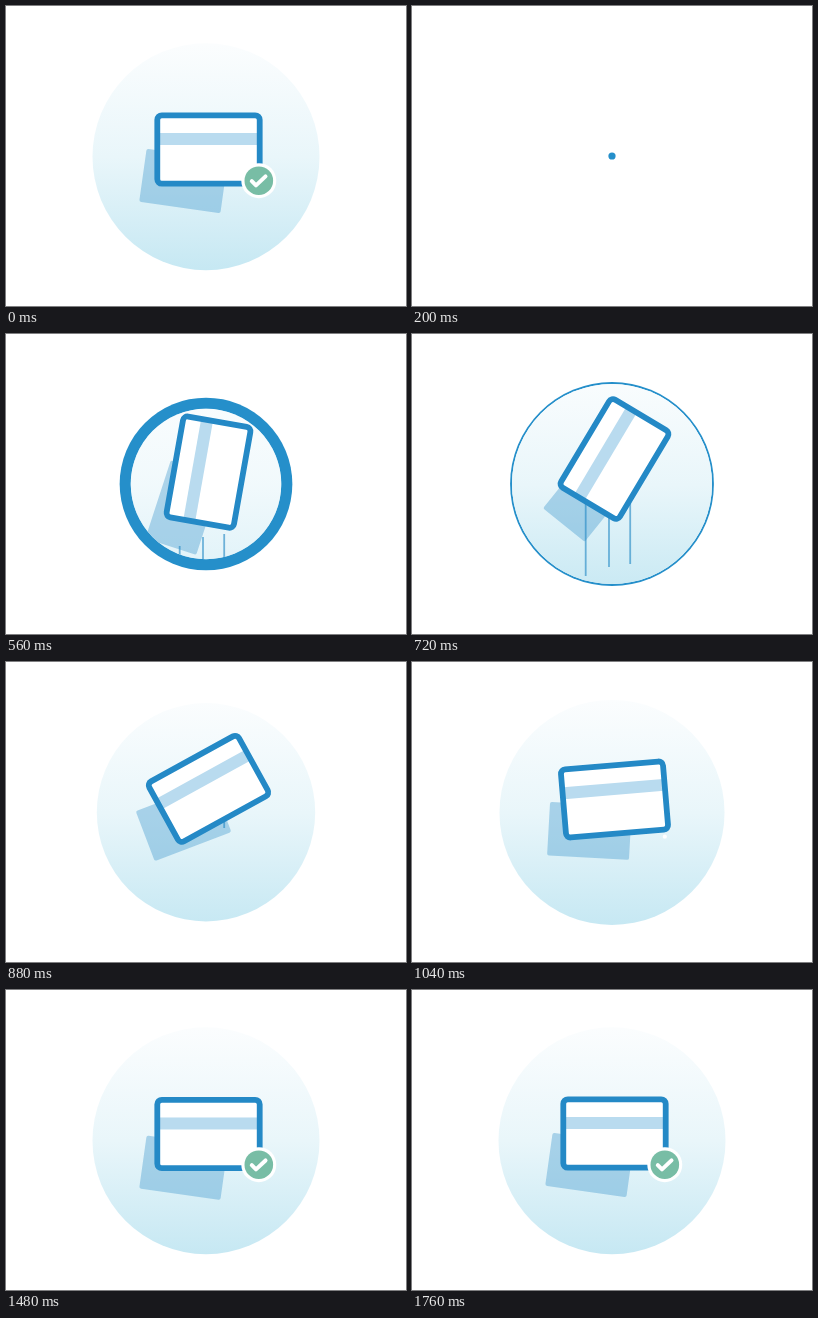
An HTML page with a canvas for the animation above (1800 ms loop, 400 px wide and 300 px high).

```html
<!DOCTYPE html>
<html>
<head>
<meta charset="utf-8">
<style>
html, body { margin: 0; width: 100%; height: 100%; overflow: hidden; background: #fff; }
canvas { display: block; }
</style>
</head>
<body>
<canvas id="stage" width="400" height="300"></canvas>
<script>
const g = document.getElementById('stage').getContext('2d');
const LOOP = 1800, STEP = 40, RADIUS = 113.5;
const BLUE = '#2489c6';

const span = (t, from, to) => Math.max(0, Math.min(1, (t - from) / (to - from)));
const mix = (a, b, p) => a + (b - a) * p;
const easeOut = p => 1 - (1 - p) ** 3;
const easeInOut = p => p * p * (3 - 2 * p);

// Bezier easing (0.52, 0, 0.045, 1): slow start, long soft tail.
function swell(x) {
  let lo = 0, hi = 1;
  for (let i = 0; i < 24; i++) {
    const s = (lo + hi) / 2, r = 1 - s;
    if (3 * s * r * r * 0.52 + 3 * s * s * r * 0.045 + s ** 3 < x) lo = s; else hi = s;
  }
  return easeInOut(lo);
}

// Shoot up to the peak, sink to the low point, settle at rest.
function toss(t, start, peak, low, rest) {
  const y = mix(start, peak, easeOut(span(t, 400, 720)));
  return y + (low - peak) * easeInOut(span(t, 800, 1280))
    + (rest - low) * easeInOut(span(t, 1280, 1520));
}

function disc(x, y, r, fill) {
  g.beginPath();
  g.arc(x, y, Math.max(0, r), 0, 2 * Math.PI);
  g.fillStyle = fill;
  g.fill();
}

function box(w, h, r, fill) {
  g.beginPath();
  g.roundRect(-w / 2, -h / 2, w, h, r);
  g.fillStyle = fill;
  g.fill();
}

function placed(x, y, degrees, paint) {
  g.save();
  g.translate(x, y);
  g.rotate(degrees * Math.PI / 180);
  paint();
  g.restore();
}

function backCard() {
  box(82, 53.5, 2, 'rgba(80,161,209,0.43)');
}

// Trails rise at a steady speed and end behind the card.
function speedLines(t) {
  const end = 235 - 0.4 * (t - 720);
  g.strokeStyle = 'rgba(36,137,198,0.62)';
  g.lineWidth = 1.8;
  for (const [x, shift] of [[173.7, 7], [197, -2], [218.2, -5]]) {
    const bottom = end + shift, top = Math.max(145, bottom - 94);
    if (bottom <= top) continue;
    g.beginPath();
    g.moveTo(x, top);
    g.lineTo(x, bottom);
    g.stroke();
  }
}

function card() {
  box(102.4, 68.4, 4.5, '#fff');
  g.fillStyle = '#b9dbef';
  g.fillRect(-50, -16.5, 100, 12);
  g.beginPath();
  g.roundRect(-51.2, -34.2, 102.4, 68.4, 4.5);
  g.strokeStyle = BLUE;
  g.lineWidth = 5.8;
  g.stroke();
}

function badge(t) {
  const size = easeOut(span(t, 1020, 1500)), drawn = easeOut(span(t, 1280, 1520));
  const r = 17.5 * size;
  disc(0, 0, r, '#fff');
  disc(0, 0, r - 3.2, `rgb(${mix(132, 120, drawn)},${mix(194, 189, drawn)},${mix(197, 165, drawn)})`);
  if (t < 1260) return;
  g.scale(size, size);
  g.rotate((1 - drawn) * Math.PI / 4);
  g.beginPath();
  g.moveTo(-7, 0.5);
  g.lineTo(-2.8, 4.7);
  g.lineTo(6.7, -4.3);
  g.setLineDash([0.01 + drawn * 19.2, 40]);
  g.lineWidth = 4;
  g.lineCap = g.lineJoin = 'round';
  g.strokeStyle = '#fff';
  g.stroke();
}

function draw(t) {
  g.fillStyle = '#fff';
  g.fillRect(0, 0, 400, 300);
  const outer = RADIUS * swell(span(t, 42, 1207));
  const inner = Math.min(outer, RADIUS * swell(span(t, 184, 1144)));
  const cy = 150 + 0.7 * span(t, 720, 1200);
  if (outer - inner > 0.1) disc(200, cy, outer, '#258fca');
  if (inner < 0.3) return;

  disc(200, cy, inner, '#fff');
  const sky = g.createLinearGradient(0, 38, 0, 264);
  sky.addColorStop(0, '#fbfdfe');
  sky.addColorStop(0.5, '#e9f6fa');
  sky.addColorStop(1, '#c6e8f3');
  g.globalAlpha = span(t, 420, 640);
  disc(200, cy, inner, sky);
  g.globalAlpha = 1;

  g.save();
  g.beginPath();
  g.arc(200, cy, inner, 0, 2 * Math.PI);
  g.clip();
  if (t > 420) {
    const angle = mix(-82, 0, easeInOut(span(t, 500, 1133)));
    placed(177.5, toss(t - 40, 219, 159, 185.5, 175), angle + 8, backCard);
    speedLines(t);
    placed(202.5, toss(t, 230, 125, 150, 143.5), angle, card);
  }
  placed(252.8, 174.7, 0, () => badge(t));
  g.restore();
}

// The loop opens on the finished picture, then restarts from blank.
function tick() {
  const t = Math.floor(performance.now() % LOOP / STEP) * STEP;
  draw(t || LOOP);
  requestAnimationFrame(tick);
}
tick();
</script>
</body>
</html>
```
